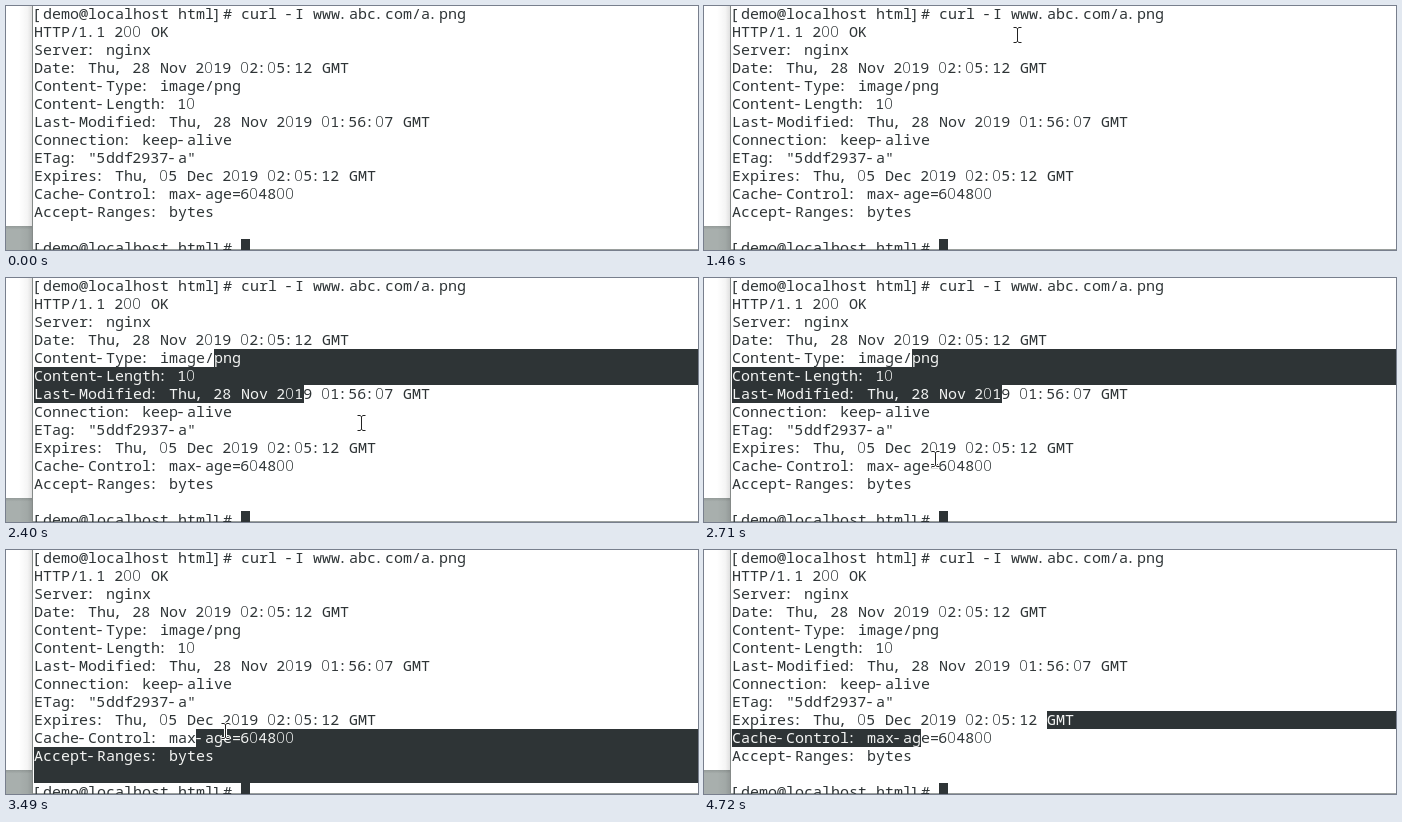
An HTML page that plays this animation: 692 px wide and 244 px high, repeating every 5880 ms.

```html
<!DOCTYPE html>
<html lang="en">
<head>
<meta charset="utf-8">
<title>Terminal session</title>
<style>
  html, body { margin: 0; width: 100%; height: 100%; overflow: hidden; background: #fff; }
  svg { display: block; width: 692px; height: 244px; }
  text { font: 300 15px "Noto Sans Mono", "DejaVu Sans Mono", monospace; white-space: pre; }
  .zero { font-family: "Open Sans", "Noto Sans", sans-serif; }
</style>
</head>
<body>
<svg viewBox="0 0 692 244">
  <defs>
    <linearGradient id="shade">
      <stop offset="0" stop-color="#000" stop-opacity="0"/>
      <stop offset=".6" stop-color="#000" stop-opacity=".04"/>
      <stop offset="1" stop-color="#000" stop-opacity=".14"/>
    </linearGradient>
    <linearGradient id="band" x2="0" y2="1">
      <stop offset="0" stop-color="#949b99"/>
      <stop offset=".15" stop-color="#a8afad"/>
    </linearGradient>
    <clipPath id="picked"></clipPath>
    <path id="beamShape" d="M-4 -7.5H-1.5L0 -6.5L1.5 -7.5H4M0 -6.5V6.5M-4 7.5H-1.5L0 6.5L1.5 7.5H4"/>
  </defs>
  <rect width="692" height="244" fill="#fff"/>
  <rect y="220" width="27" height="24" fill="url(#band)"/>
  <rect x="13" width="14" height="244" fill="url(#shade)"/>
  <rect x="26" width="1" height="244" fill="#858a88"/>
  <rect x="27" y="243" width="665" height="1" fill="#9a9f9d"/>
  <g id="plain" fill="#2e3436"></g>
  <rect x="235" y="233" width="9" height="11" fill="#2e3436"/>
  <g clip-path="url(#picked)">
    <rect width="692" height="244" fill="#2e3436"/>
    <g id="bright" fill="#f3f4f3"></g>
  </g>
  <g id="beam" fill="none">
    <use href="#beamShape" stroke="#fff" stroke-width="3"/>
    <use href="#beamShape" stroke="#222"/>
  </g>
  <path id="hand" fill="#fff" stroke="#1e1e38" stroke-width="1.2" stroke-linejoin="round"
    d="M-3.5 3V-9.5a1.8 1.8 0 0 1 3.6 0V-3a1.7 1.7 0 0 1 3.2 .3V-2a1.6 1.6 0 0 1 2.9 .4V-.8a1.4 1.4 0 0 1 2.3 1V5C8.5 8 7 8.5 6.6 11.3H-2.6C-3 8.5-5.5 6.5-8 2.5C-9 .7-7-.5-5.6 .8ZM0-3V1M3.3-2V1M6.2-1V1.5"/>
</svg>
<script>
const LOOP = 5880, PACE = 78, LEFT = 28, RIGHT = 692, CELL = 9, ROW = 18;
const $ = id => document.getElementById(id);

const screen = `[demo@localhost html]# curl -I www.abc.com/a.png
HTTP/1.1 200 OK
Server: nginx
Date: Thu, 28 Nov 2019 02:05:12 GMT
Content-Type: image/png
Content-Length: 10
Last-Modified: Thu, 28 Nov 2019 01:56:07 GMT
Connection: keep-alive
ETag: "5ddf2937-a"
Expires: Thu, 05 Dec 2019 02:05:12 GMT
Cache-Control: max-age=604800
Accept-Ranges: bytes

[demo@localhost html]# `;

// Narrow glyphs sit at the left of their cell.
const nudge = c => /[-:,.[\]]/.test(c) ? -2 : /\d/.test(c) ? -0.7 : 0;

function lineMarkup(line, row) {
  const xs = [...line].map((c, i) => LEFT + i * CELL + nudge(c)).join(' ');
  const body = line.replace(/0+/g, '<tspan class="zero">$&</tspan>');
  return `<text x="${xs}" y="${row * ROW + 13}">${body}</text>`;
}
$('plain').innerHTML = $('bright').innerHTML = screen.split('\n').map(lineMarkup).join('');

// Pointer moves: start time, steps, goal.
const moves = [
  [70, 2, 325, 161],
  [350, 6, 284, 21],
  [910, 6, 232, 19],
  [1460, 3, 474, 50],
  [1760, 2, 294, 80],
  [1940, 2, 207, 80],
  [2240, 3, 355, 145],
  [2480, 4, 190, 193],
  [2860, 1, 279, 215],
  [2940, 1, 264, 222],
  [3090, 6, 219, 181],
  [3561, 2, 346, 170],
  [3720, 5, 242, 73],
  [4110, 3, 262, 99],
  [4330, 6, 600, 260]
];

// Selections: time, text where they begin, text they stop before.
const picks = [
  [0, '', ''],
  [1540, 'Server', 'Date'],
  [2240, 'png', '10'],
  [2318, 'png', '9 01:56'],
  [2860, '-age', '\n['],
  [2940, '-age', '['],
  [3561, '5:12 GMT', 'e=6'],
  [3640, 'GMT', 'e=6']
];

function pointerAt(t) {
  let x = 560, y = 260;
  for (const [start, count, goalX, goalY] of moves) {
    if (t < start) break;
    const u = Math.min(1, (Math.floor((t - start) / PACE) + 1) / count);
    x += Math.round((goalX - x) * u);
    y += Math.round((goalY - y) * u);
  }
  return [x, y];
}

function cellOf(mark) {
  const before = screen.slice(0, screen.lastIndexOf(mark)).split('\n');
  return [before.length - 1, before.pop().length];
}

function selectionMarkup([, from, to]) {
  const [r0, c0] = cellOf(from), [r1, c1] = cellOf(to);
  let out = '';
  for (let r = r0; r <= r1; r++) {
    const x0 = r === r0 ? LEFT + c0 * CELL : LEFT;
    const x1 = r === r1 ? LEFT + c1 * CELL : RIGHT;
    out += `<rect x="${x0}" y="${r * ROW - 1}" width="${x1 - x0}" height="${ROW}"/>`;
  }
  return out;
}

function place(el, x, y, shown) {
  el.setAttribute('transform', `translate(${x} ${y})`);
  el.setAttribute('visibility', shown ? 'visible' : 'hidden');
}

let lastPick;
function draw(t) {
  const [x, y] = pointerAt(t);
  const isHand = t < 1150;
  place($('hand'), x, y, isHand);
  place($('beam'), x + 0.5, y, !isHand);
  const pick = picks.filter(p => p[0] <= t).pop();
  if (pick !== lastPick) $('picked').innerHTML = selectionMarkup(lastPick = pick);
}

const begin = performance.now();
function tick() {
  draw((performance.now() - begin) % LOOP);
  requestAnimationFrame(tick);
}
tick();
</script>
</body>
</html>
```
